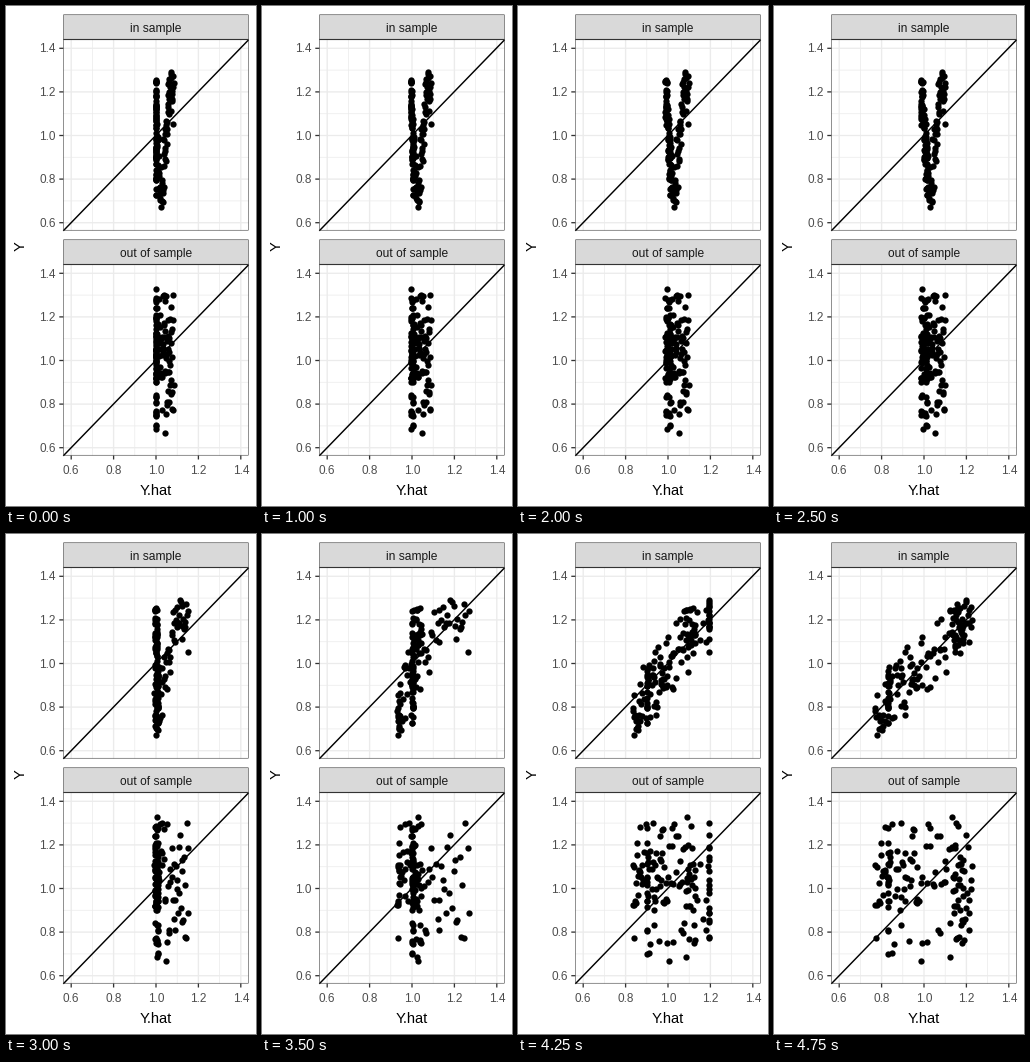
A matplotlib script for the animation above (5 s loop, 250 by 500 pixels).

```python
import numpy as np
import matplotlib.pyplot as plt
from matplotlib.animation import FuncAnimation
from matplotlib.patches import Rectangle

W, H, PT = 250, 500, 0.72
STEP, FRAMES = 250, 20
LEFT, RIGHT = 57.3, 242.6
SX, SY = 212, 218
TOPS = (33.5, 258.5)
LINE = 1.07
DARK = "#333333"
N = 145


# The fitted curve over the input u in 0..1, as it learns.
def early(u, t):
    ramp = np.maximum(2 * u - 1, 0)
    ripple = np.where(u < .5, np.sin(4 * np.pi * u), 0)
    return 1 + (.083 + .007 * t) * ramp + .006 * t * ripple


def middle(u):
    return np.interp(u, [0, .3, .42, .52, .57, .67, 1],
                     [1.005, 1, 1.045, 1, .945, .93, 1.27])


def late(u):
    return np.interp(u, [0, .08, .18, .3, .44, .56, .67, .87, 1],
                     [.98, .83, .83, 1.13, 1.19, .84, .765, 1.23, 1.14])


def fit(u, t):
    if t <= 3.5:
        s = max(t - 2.5, 0) ** 1.7
        return (1 - s) * early(u, min(t, 2.5)) + s * middle(u)
    s = (t - 3.5) / 1.25
    return (1 - s) * middle(u) + s * late(u)


rng = np.random.RandomState(4)
u = (np.arange(N) + rng.rand(N)) / N
u[-1] = 1
y_in = np.clip(late(u) + rng.triangular(-.18, 0, .18, N), .67, 1.33)
y_out = rng.triangular(.6, 1.05, 1.4, N)


def px(v):
    return 150 + (v - 1) * SX


def py(v, top):
    return top + 96 - (v - 1) * SY


fig = plt.figure(figsize=(W / 100, H / 100), dpi=100, facecolor="white")
ax = fig.add_axes([0, 0, 1, 1])
ax.set_xlim(0, W)
ax.set_ylim(H, 0)
ax.axis("off")


def line(xs, ys, color, width, z):
    ax.plot(xs, ys, color=color, lw=width * PT, zorder=z,
            solid_capstyle="butt", snap=False)


def text(x, y, s, size, color, ha="center", **kw):
    ax.text(x, y, s, fontsize=size * PT, color=color, ha=ha,
            family="Liberation Sans", **kw)


def box(top, bottom, fill, z):
    # The outer half of the border is cut off.
    inset = LINE / 4
    ax.add_patch(Rectangle((LEFT + inset, top + inset), RIGHT - LEFT - 2 * inset,
                           bottom - top - 2 * inset, fc=fill, ec=DARK,
                           lw=LINE / 2 * PT, zorder=z, snap=False))


def panel(top, label):
    bottom = top + 191
    for k in range(6, 15):
        v, major = k / 10, k % 2 == 0
        x, y = px(v), py(v, top)
        width = 1.3 if major else .7
        line([x, x], [top, bottom], "#EBEBEB", width, 1)
        line([LEFT, RIGHT], [y, y], "#EBEBEB", width, 1)
        if major:
            line([LEFT - 4, LEFT], [y, y], DARK, 1.3, 1)
            text(49.5, y + 4.2, f"{v:.1f}", 11.73, "#4D4D4D", "right")
    line([LEFT, RIGHT], [bottom + .3, top + .3], "black", 1.45, 2)
    box(top, bottom, "none", 4)
    box(top - 25, top, "#D9D9D9", 5)
    line([LEFT, RIGHT], [top, top], DARK, LINE, 6)
    text(149.7, top - 7.5, label, 12, "#1A1A1A", zorder=6)
    return ax.scatter([], [], s=(6.3 * PT) ** 2, c="black", lw=0, zorder=3)


dots = [panel(top, s) for top, s in zip(TOPS, ("in sample", "out of sample"))]
for k in range(6, 15, 2):
    x = px(k / 10)
    line([x, x], [449.5, 453.5], DARK, 1.3, 1)
    text(x, 467.5, f"{k / 10:.1f}", 11.73, "#4D4D4D")
text(149.5, 489, "Y.hat", 14.67, "black")
text(15, 240, "Y", 14.67, "black", va="center", rotation=90)


def draw(i):
    x = px(fit(u, i * STEP / 1000))
    for d, y, top in zip(dots, (y_in, y_out), TOPS):
        d.set_offsets(np.column_stack([x, py(y, top)]))
    return dots


anim = FuncAnimation(fig, draw, frames=FRAMES, interval=STEP, repeat=True,
                     repeat_delay=0, init_func=lambda: draw(0))
plt.show()
```
